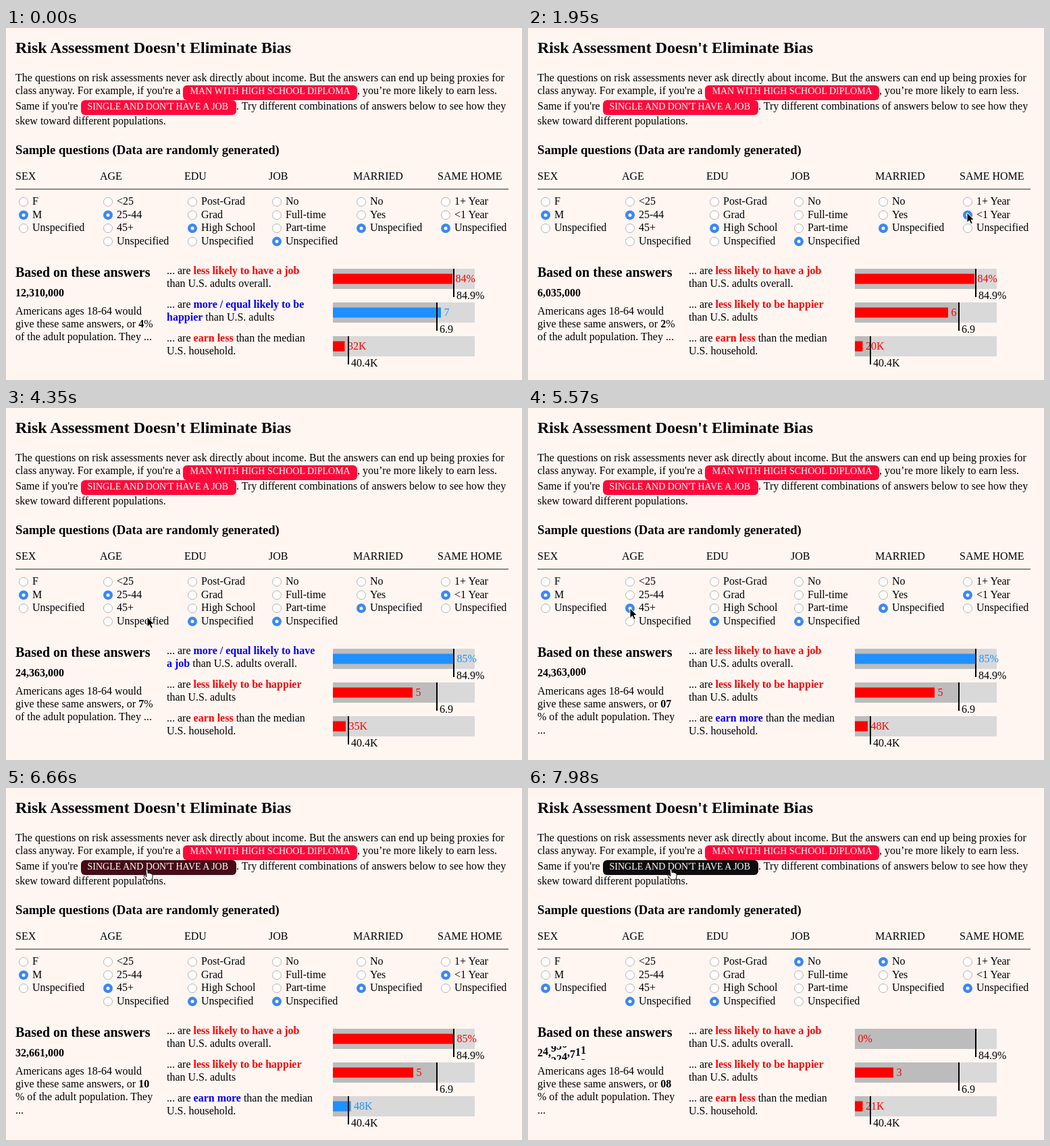
An HTML page for the animation above (8000 ms loop, 764 by 522 pixels).

```html
<!DOCTYPE html>
<html lang="en">
<head>
<meta charset="utf-8">
<title>Risk Assessment</title>
<style>
html, body { margin: 0; width: 100%; height: 100%; overflow: hidden; background: #fff6f2; }
svg { display: block; }
text { font: 16px "Liberation Serif", Times, serif; white-space: pre; }
.b { font-weight: bold; }
.h1 { font-size: 24px; }
.h2 { font-size: 18.72px; }
.h3 { font-size: 20px; }
.pill { font-size: 14px; fill: #fff; }
</style>
</head>
<body>
<svg width="764" height="522" viewBox="0 0 764 522">
  <clipPath id="rollers"><path d="M10 383H110V403H10ZM190 429H225V449H190Z"/></clipPath>
  <g id="page"></g>
  <g id="live"></g>
  <g id="cursor"></g>
</svg>
<script>
const LOOP = 8000, ROLL = 490, SLIDE = 250, ROW = 19;
const $ = id => document.getElementById(id);
const clamp = v => Math.max(0, Math.min(1, v));
const mix = (a, b, p) => a + (b - a) * p;
const smooth = p => p * p * (3 - 2 * p);
const cubic = p => p < .5 ? 4 * p ** 3 : 1 - 4 * (1 - p) ** 3;
const esc = s => String(s).replace(/</g, '&lt;');

const text = (x, y, s, cls = '', fill = '#000') => `<text x="${x}" y="${y}" class="${cls}" fill="${fill}">${esc(s)}</text>`;
const rect = (x, y, w, h, fill, rx = 0) => `<rect x="${x}" y="${y}" width="${w}" height="${h}" rx="${rx}" fill="${fill}"/>`;

// CSS "ease": cubic-bezier(.25, .1, .25, 1)
function ease(x) {
  if (x <= 0 || x >= 1) return clamp(x);
  let lo = 0, hi = 1, u;
  for (let i = 0; i < 24; i++) {
    u = (lo + hi) / 2;
    if (.75 * u * (1 - u) + u ** 3 < x) lo = u; else hi = u;
  }
  return .3 * u * (1 - u) ** 2 + 3 * u * u * (1 - u) + u ** 3;
}

const RED = [255, 0, 0], BLUE = [30, 144, 255], PILL = [255, 10, 58], DARK = [15, 12, 14];
const tint = (a, b, p) => `rgb(${a.map((v, i) => Math.round(mix(v, b[i], p)))})`;

const questions = [
  ['SEX', 'F', 'M', 'Unspecified'],
  ['AGE', '<25', '25-44', '45+', 'Unspecified'],
  ['EDU', 'Post-Grad', 'Grad', 'High School', 'Unspecified'],
  ['JOB', 'No', 'Full-time', 'Part-time', 'Unspecified'],
  ['MARRIED', 'No', 'Yes', 'Unspecified'],
  ['SAME HOME', '1+ Year', '<1 Year', 'Unspecified']
];
const averages = [[663, '84.9%'], [638, '6.9'], [507, '40.4K']];

// good: which of job, happiness and income are at or above average
const states = [
  { at: -LOOP, pick: [1, 1, 2, 3, 2, 2], count: 12310000, pct: 4, good: [0, 1, 0], ends: [661, 644, 501.5], labels: ['84%', '7', '32K'] },
  { at: 1450, pick: [1, 1, 2, 3, 2, 1], count: 6035000, pct: 2, good: [0, 0, 0], ends: [661, 622, 495.5], labels: ['84%', '6', '20K'] },
  { at: 3630, pick: [1, 1, 3, 3, 2, 1], count: 24363000, pct: 7, good: [1, 0, 0], ends: [663, 602, 503], labels: ['85%', '5', '35K'] },
  { at: 5570, pick: [1, 2, 3, 3, 2, 1], count: 32661000, pct: 10, good: [0, 0, 1], ends: [663, 603, 510.5], labels: ['85%', '5', '48K'] },
  { at: 7560, pick: [2, 3, 3, 0, 0, 2], count: 24956000, pct: 8, good: [0, 0, 0], ends: [484, 541, 495.5], labels: ['0%', '3', '21K'] }
];
// held mouse button: from, to, column, row
const presses = [[1400, 1450, 5, 1], [3340, 3630, 2, 3]];

// time, x, y of the pointer tip
const path = [
  [500, 709, 350], [900, 644, 276], [1100, 650, 274], [2300, 650, 274], [2900, 280, 316], [3010, 276, 313],
  [3700, 276, 313], [4350, 209, 310], [4580, 173, 300], [4750, 173, 300], [5030, 147, 294], [5180, 151, 297],
  [5850, 151, 297], [6320, 196, 147], [6430, 205, 124], [6560, 209, 121], [6880, 209, 121], [6970, 212, 120]
];
const HOVER = 6430;
const arrow = '<path d="M0 0V14.5L3.4 11.4 5.8 16.7 8.3 15.6 6 10.5H10.6Z" stroke="#fff"/>';
const hand = '<path d="M-2 1.2C-2-.4.6-.4.7 1.2L1.4 6 2 5.4C3-.2 3 5.4 4 6 5 5.4 6 5.6 6.4 6.6 7.6 6.4 8 7.2 8 8.2V11.5L6.6 16H0L-4.6 10.4C-5.6 8.8-4.2 8-3 9L-1 10.6Z" fill="#fff" stroke="#000"/>';

$('page').innerHTML =
  text(14, 37, "Risk Assessment Doesn't Eliminate Bias", 'b h1') +
  text(14, 79, 'The questions on risk assessments never ask directly about income. But the answers can end up being proxies for') +
  text(14, 98, "class anyway. For example, if you're a") +
  text(520, 98, ', you’re more likely to earn less.') +
  text(14, 121, "Same if you're") +
  text(341, 121, '. Try different combinations of answers below to see how they') +
  text(14, 143, 'skew toward different populations.') +
  rect(262, 85, 258, 22, `rgb(${PILL})`, 6) +
  text(272.5, 98, 'MAN WITH HIGH SCHOOL DIPLOMA', 'pill', '#fff') +
  text(14, 187, 'Sample questions (Data are randomly generated)', 'b h2') +
  rect(14, 238.5, 730, 1, '#222') +
  questions.map(([head, ...opts], c) => text(14 + 125 * c, 225, head) +
    opts.map((o, r) => text(39 + 125 * c, Math.round(262.2 + 19.6 * r), o)).join('')).join('') +
  text(14, 369, 'Based on these answers', 'b h3') +
  text(14, 425, 'Americans ages 18-64 would') +
  text(14, 444, 'give these same answers, or ');

function radio(c, r, on, held) {
  const at = `cx="${26 + 125 * c}" cy="${257.8 + 19.6 * r}"`;
  return on
    ? `<circle ${at} r="7" fill="#3b87f7"/><circle ${at} r="2.5" fill="#fff"/>`
    : `<circle ${at} r="6.5" fill="${held ? '#d4d4d4' : '#fff'}" stroke="#b4b2b1"/>`;
}

// Digits that pass through one place of the counter
function ribbon(from, to, boost) {
  const dist = to - from, n = Math.abs(dist), list = [];
  const steps = n > 30 ? 30 * (1 + boost / 2) : n;
  for (let i = 0; i <= steps; i++) list.push(Math.round(from + (steps ? dist * i / steps : 0)) % 10);
  return list;
}

function counter(a, b, p, x, y) {
  if (p >= 1) return text(x, y, b.toLocaleString('en-US'), 'b');
  const places = String(Math.max(a, b)).length, dir = Math.sign(b - a), e = ease(p);
  let out = '', boost = 0;
  for (let k = places - 1; k >= 0; k--) {
    const from = Math.floor(a / 10 ** k), to = Math.floor(b / 10 ** k);
    const list = ribbon(from, to, boost);
    if (Math.abs(to - from) > 30) boost++;
    const pos = (list.length - 1) * e, i = Math.floor(pos), f = pos - i;
    out += text(x, y - dir * f * ROW, list[i], 'b');
    if (f) out += text(x, y + dir * (1 - f) * ROW, list[i + 1], 'b');
    x += 8;
    if (k && k % 3 === 0) {
      out += text(x, y, ',', 'b');
      x += 4;
    }
  }
  return `<g clip-path="url(#rollers)">${out}</g>`;
}

function verdicts([job, happy, earn]) {
  const hot = (good, s) => `<tspan class="b" fill="${good ? '#00f' : '#f00'}">${s}</tspan>`;
  const rows = [
    job ? ['... are ' + hot(1, 'more / equal likely to have'), hot(1, 'a job') + ' than U.S. adults overall.']
      : ['... are ' + hot(0, 'less likely to have a job'), 'than U.S. adults overall.'],
    happy ? ['... are ' + hot(1, 'more / equal likely to be'), hot(1, 'happier') + ' than U.S. adults']
      : ['... are ' + hot(0, 'less likely to be happier'), 'than U.S. adults'],
    ['... are ' + hot(earn, earn ? 'earn more' : 'earn less') + ' than the median', 'U.S. household.']
  ];
  return rows.map((pair, r) => pair.map((s, i) =>
    `<text x="238" y="${365 + 50 * r + 19 * i}">${s}</text>`).join('')).join('');
}

function bars(prev, now, p) {
  return averages.map(([mark, label], r) => {
    const y = 357 + 50 * r, end = mix(prev.ends[r], now.ends[r], p);
    const color = tint(prev.good[r] ? BLUE : RED, now.good[r] ? BLUE : RED, p);
    return rect(484, y, 210, 30, '#d9d9d9') + rect(484, y, mark - 484, 30, '#bcbcbc') +
      rect(484, y + 7.5, end - 484, 15, color) +
      text(end + 4.5, y + 20, now.labels[r], '', color) +
      rect(mark - 1, y, 2, 42, '#000') + text(mark + 4, y + 45, label);
  }).join('');
}

function pointer(t) {
  if (t < path[0][0]) return '';
  let i = path.findIndex(k => k[0] > t);
  if (i < 0) i = path.length - 1;
  const [t0, x0, y0] = path[i - 1], [t1, x1, y1] = path[i];
  const p = smooth(clamp((t - t0) / (t1 - t0)));
  return `<g transform="translate(${mix(x0, x1, p)} ${mix(y0, y1, p)})">${t < HOVER ? arrow : hand}</g>`;
}

function draw(t) {
  const n = states.filter(s => s.at <= t).length - 1;
  const now = states[n], prev = states[n - 1] || now, age = t - now.at;
  const roll = clamp(age / ROLL), slide = cubic(clamp(age / SLIDE));
  const wide = now.pct > 9 || (roll < 1 && prev.pct > 9);
  const held = presses.find(([from, to]) => t >= from && t < to) || [];

  $('live').innerHTML =
    rect(111, 107, 230, 22, tint(PILL, DARK, clamp((t - HOVER) / 300)), 6) +
    text(120.5, 121, "SINGLE AND DON'T HAVE A JOB", 'pill', '#fff') +
    questions.map((q, c) => q.slice(1).map((_, r) =>
      radio(c, r, now.pick[c] === r, held[2] === c && held[3] === r)).join('')).join('') +
    counter(prev.count, now.count, roll, 14, 398) +
    counter(prev.pct, now.pct, roll, 196.2, 444) +
    (wide ? text(14, 463, '% of the adult population. They') + text(14, 483, '...')
      : text(204.2, 444, '%') + text(14, 463, 'of the adult population. They ...')) +
    verdicts(now.good) + bars(prev, now, slide);
  $('cursor').innerHTML = pointer(t);
}

const start = performance.now();
function tick() {
  draw((performance.now() - start) % LOOP);
  requestAnimationFrame(tick);
}
tick();
</script>
</body>
</html>
```
